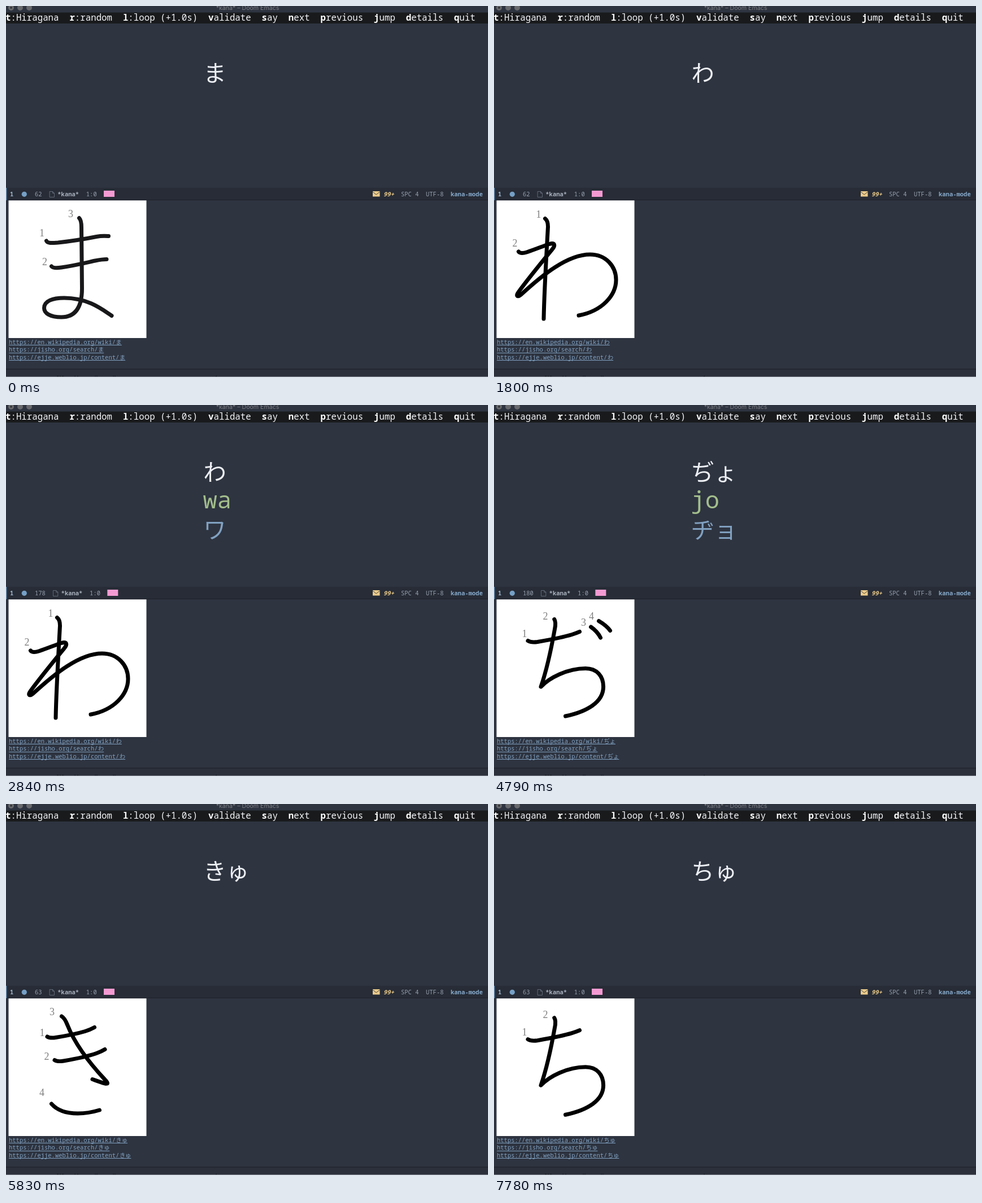
An HTML page with a canvas that plays this animation: 853 by 657 pixels, repeating every 8 s.

```html
<!DOCTYPE html>
<html lang="ja">
<head>
<meta charset="utf-8">
<title>Kana drill</title>
<style>
html, body { margin: 0; width: 100%; height: 100%; overflow: hidden; background: #2e3440; }
canvas { display: block; width: 853px; height: 657px; }
</style>
</head>
<body>
<canvas id="stage" width="853" height="657"></canvas>
<script>
const ctx = document.getElementById('stage').getContext('2d');
const MONO = '"Noto Sans Mono", "Noto Sans CJK JP", "Noto Sans CJK", monospace';
const KANA = '"Noto Sans CJK JP", "Noto Sans CJK", sans-serif';
const SERIF = '"Liberation Serif", serif';
const SMALL = 10.5, CELL = 6.32, LOOP = 8000;
const BG = '#2e3440', BLUE = '#81a1c1', GREY = '#98a1b0';

// Stroke diagrams; labels are [digit, x, baseline].
const CHI = [
  'M60 417.5C64 420 70 420.5 77 419.5C100 415.5 130 409 138 406.5C144 404.5 148 403 151.5 401.5',
  'M106.8 379.5C109.5 384 109 390 107.5 397C102 428 93 470 83 499C98 483 130 466.5 162 466.5C182 466.5 193.5 480 193.5 499C193.5 526 165 543 126.5 551'
];
const diagrams = {
  ma: {
    ink: '#18181a',
    strokes: [
      'M71.5 416C74 421 84 419.5 92 419C120 416 150 410.5 160 408.5C170 406.5 175 407 181.5 407.5',
      'M80.5 461C84 465 92 464 98 463C125 459 148 453 158 451C168 449 173 448.5 178 448.5',
      'M129.5 375.5C133 379 133.5 386 133.5 392L134.5 500C134.5 530 125 551 98 551C78 551 67.5 544 67.5 535C67.5 522 83 517 103 517C145 517 170 537 187 548.5'
    ],
    labels: [['1', 58.5, 408], ['2', 63.5, 459], ['3', 109.5, 374]]
  },
  wa: {
    strokes: [
      'M90.5 376.5C95 380 95.5 385 95.5 391C94 420 89 500 88 554',
      'M43.5 435C46 438 52 438 58 436C73 431 90 424 98 421.5C108 418.5 109 424 103 431C85 453 58 486 43 507C38 514 42 516 48 511C85 477 130 440 170 440C198 440 216 461 216 485C216 512 192 540 150 548'
    ],
    labels: [['1', 74, 375], ['2', 32, 426]]
  },
  di: {
    strokes: [...CHI,
      'M171.5 393C178 397.5 185 405 188.5 412',
      'M185.5 382.5C193 387 201 393 205.5 399.5'
    ],
    labels: [['1', 49, 411], ['2', 86, 380], ['3', 153.5, 391], ['4', 167.5, 380]]
  },
  ki: {
    strokes: [
      'M73 412C77 414.5 82 414.5 88 413.5C110 410 130 405.5 140 402.5C147 400.5 152 398 156.5 395.5',
      'M86 453.5C90 456 96 456 102 455C128 450.5 150 445 160 441.5C167 439 171 437 175 434.5',
      'M98.5 376C104 379 107 387 109 392C122 425 148 459 175 488C181 494 181 496 175 495C168 493 160 490 153 487.5',
      'M80.5 531C91 543 106 548 127 548C140 548 154 545.5 165.5 542'
    ],
    labels: [['1', 59, 411], ['2', 67, 453], ['3', 76.5, 374], ['4', 58.5, 517]]
  },
  chi: { strokes: CHI, labels: [['1', 49, 411], ['2', 86, 380]], lift: 0.8 }
};

const cards = [
  { start: 0, reveal: 750, hira: 'ま', roma: 'ma', kata: 'マ', art: diagrams.ma },
  { start: 1800, reveal: 2840, hira: 'わ', roma: 'wa', kata: 'ワ', art: diagrams.wa },
  { start: 3890, reveal: 4790, hira: 'ぢょ', roma: 'jo', kata: 'ヂョ', art: diagrams.di },
  { start: 5830, reveal: 6730, hira: 'きゅ', roma: 'kyu', kata: 'キュ', art: diagrams.ki },
  { start: 7780, reveal: LOOP, hira: 'ちゅ', roma: 'chu', kata: 'チュ', art: diagrams.chi }
];

function rect(x, y, w, h, color) {
  ctx.fillStyle = color;
  ctx.fillRect(x, y, w, h);
}

function disc(x, y, r, color) {
  ctx.fillStyle = color;
  ctx.beginPath();
  ctx.arc(x, y, r, 0, Math.PI * 2);
  ctx.fill();
}

function text(str, x, y, color, size = SMALL, style = '500', family = MONO) {
  ctx.font = `${style} ${size}px ${family}`;
  ctx.fillStyle = color;
  ctx.fillText(str, x, y);
}

function line(path, color, width) {
  ctx.strokeStyle = color;
  ctx.lineWidth = width;
  ctx.stroke(new Path2D(path));
}

function titleBar() {
  [9, 25, 41].forEach(x => disc(x, 3, 5, '#68696c'));
  disc(9, 3, 1.8, '#2b2d31');
  ctx.textAlign = 'center';
  text('*kana* – Doom Emacs', 427.5, 7, '#7d7f84', 10.6, '', 'Inter, sans-serif');
  ctx.textAlign = 'left';
}

function menuBar() {
  rect(0, 11.5, 853, 19.5, '#191a1c');
  const items = 't:Hiragana r:random l:loop_(+1.0s) validate say next previous jump details quit'.split(' ');
  const cell = 9.45, size = 15.75;
  let x = -1;
  for (const item of items) {
    text(item[0], x, 26, '#ffffff', size, 'bold');
    text(item.slice(1).replace('_', ' '), x + cell, 26, '#f4f6f9', size);
    x += (item.length + 2) * cell;
  }
}

function modeLine(count) {
  rect(0, 322, 853, 22, '#272c36');
  rect(0, 343, 853, 1, '#1d2129');
  rect(0, 322, 1.3, 22, '#6f95b9');
  const y = 336.5, dx = (String(count).length - 2) * CELL;
  text('1', 7, y, '#9db4ca', SMALL, 'bold');
  disc(32.3, 333.3, 4.6, '#76a0c6');
  text(count, 51, y, GREY);
  line(`M${77.5 + dx} 328.5h5l3 3v7h-8zM${82.5 + dx} 328.5v3h3`, '#626a78', 1);
  text('*kana*', 91.3 + dx, y, '#a9b1be', SMALL, 'bold');
  text('1:0', 141.8 + dx, y, GREY);
  rect(173 + dx, 327, 19, 11, '#f49ad2');
  rect(649, 328, 12.5, 9.5, '#ebcb8b');
  line('M649.5 329.5L655.2 334L661 329.5', '#4a4540', 1);
  text('99+', 668, y, '#ebcb8b', SMALL, 'italic bold');
  text('SPC 4', 699, y, GREY);
  text('UTF-8', 743, y, GREY);
  text('kana-mode', 787, y, '#86a9cb', SMALL, 'bold');
}

function diagram({ strokes, labels, ink = '#000000', lift = 0 }) {
  rect(4.5, 344.3, 244, 243.7, '#ffffff');
  ctx.save();
  ctx.translate(0, -lift);
  for (const [digit, x, y] of labels) text(digit, x + 0.6, y, '#808080', 18, '', SERIF);
  for (const path of strokes) line(path, ink, 7);
  ctx.restore();
}

function links(kana) {
  const urls = ['https://en.wikipedia.org/wiki/', 'https://jisho.org/search/', 'https://ejje.weblio.jp/content/'];
  urls.forEach((url, i) => {
    const y = 598.5 + i * 13.5, w = url.length * CELL;
    text(url, 5, y, BLUE);
    text(kana, 5 + w, y + 0.3, BLUE, 10.2, '', KANA);
    rect(5, Math.round(y + 1.5), w + kana.length * 10.2, 1, BLUE);
  });
}

function footer() {
  rect(0, 643, 853, 14, '#2b303b');
  rect(0, 642.5, 853, 1, '#1b1f26');
  [[90, 3], [95, 2], [99, 3], [121, 2], [126, 2], [157, 2], [160, 2], [189, 2], [192, 2], [371, 2]]
    .forEach(([x, w]) => rect(x, 655, w, 1, '#14171c'));
  rect(0, 656, 853, 1, '#777c85');
}

function draw(t) {
  const card = cards.findLast(c => c.start <= t);
  const shown = t >= card.reveal;
  const { hira, roma, kata } = card;
  // Each centred line has 55 columns of padding.
  const count = 61 + hira.length + (shown ? 113 + roma.length + kata.length : 0);

  rect(0, 0, 853, 657, BG);
  ctx.lineCap = ctx.lineJoin = 'round';
  titleBar();
  menuBar();
  text(hira, 349.2, 134.3, '#eceff4', 40.5, '', KANA);
  if (shown) {
    text(roma, 348.5, 183.3, '#a3be8c', 42);
    text(kata, 349.2, 235.5, BLUE, 40.5, '', KANA);
  }
  modeLine(count);
  diagram(card.art);
  links(hira);
  footer();
}

const began = performance.now();
function tick() {
  draw((performance.now() - began) % LOOP);
  requestAnimationFrame(tick);
}
tick();
</script>
</body>
</html>
```
